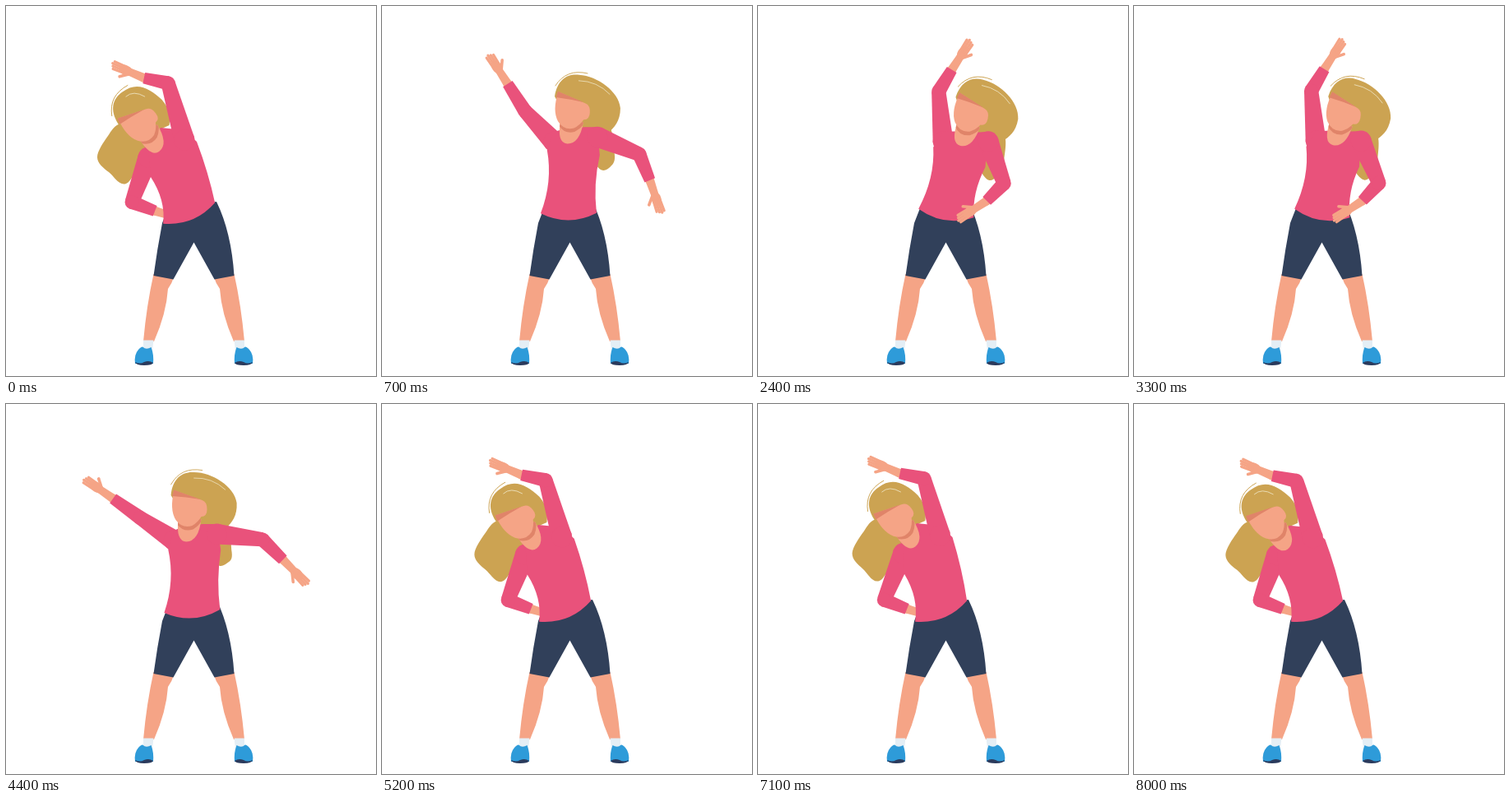
Recreate the animation shown at these times as an HTML page with a canvas. Size 450 px wide and 450 px high, loop 8.1 s.

```html
<!DOCTYPE html>
<html lang="en">
<head>
<meta charset="utf-8">
<title>Side bends</title>
<style>
  html, body { margin: 0; width: 100%; height: 100%; overflow: hidden; background: #fff; }
  canvas { display: block; width: 450px; height: 450px; }
</style>
</head>
<body>
<canvas id="stage"></canvas>
<script>
const canvas = document.getElementById('stage');
const ctx = canvas.getContext('2d');
const scale = window.devicePixelRatio || 1;
canvas.width = canvas.height = 450 * scale;

const PINK = '#e9527b', SKIN = '#f5a486', SHADE = '#e08469', HAIR = '#cca352',
      NAVY = '#31405a', BLUE = '#2e9bd9', SOLE = '#2a3a5c', SOCK = '#e4eef5';
const LOOP = 8100, HALF = LOOP / 2, PULSE = HALF / 3, SWING = 1150, MID = 0.33;

// Arms: upper, fore and hand angle in degrees, then upper and fore length.
const leftBend = {
  head: [163, 145], turn: [-38], volume: [40], hip: [-22], waist: [3],
  shoulderA: [173, 184], armA: [-250, -339, -343, 58, 30], pitA: [176, 208],
  shoulderB: [217, 163], armB: [-106, -168, -157, 72, 30], pitB: [232, 165], thumbB: [-1],
  locks: [124, 158, 111, 184, 125, 202, 150, 213]
};
const upright = {
  head: [220, 128], turn: [0], volume: [60], hip: [-3.5], waist: [-5],
  shoulderA: [204, 166], armA: [-147, -146, -147, 49, 41], pitA: [197, 177],
  shoulderB: [256, 158], armB: [6, 43, 44, 56, 35], pitB: [261, 177], thumbB: [1],
  locks: [240, 170, 256, 195, 269, 193, 274, 180]
};
const rightBend = {
  head: [257, 132], turn: [13], volume: [60], hip: [9], waist: [-9],
  shoulderA: [226, 165], armA: [-95, -59, -57, 61, 31], pitA: [214, 172],
  shoulderB: [281, 165], armB: [70, 135, 147, 54, 30], pitB: [277, 196], thumbB: [1],
  locks: [262, 180, 278, 210, 291, 207, 300, 187]
};

let weights, lean, lift;

const rad = d => d * Math.PI / 180;
const step = ([x, y], deg, len) => [x + Math.cos(rad(deg)) * len, y + Math.sin(rad(deg)) * len];
const mix = key => leftBend[key].map((l, i) =>
  l * weights[0] + upright[key][i] * weights[1] + rightBend[key][i] * weights[2]);

// The pulse moves the upper body and leaves the hips in place.
function sway([x, y]) {
  const h = Math.min(1, Math.max(0, (255 - y) / 105));
  const s = h * h * (3 - 2 * h);
  return [x + lean * s, y + lift * s];
}
const joint = key => sway(mix(key));

function headPoint(x, y) {
  const turn = mix('turn')[0];
  return step(step(joint('head'), turn, x), turn + 90, y);
}

function onHead(paint) {
  ctx.save();
  ctx.translate(...joint('head'));
  ctx.rotate(rad(mix('turn')[0]));
  paint();
  ctx.restore();
}

function draw(d, color) {
  ctx.fillStyle = color;
  ctx.fill(new Path2D(d));
}

function line(d, color, width) {
  ctx.lineCap = 'round';
  ctx.strokeStyle = color;
  ctx.lineWidth = width;
  ctx.stroke(new Path2D(d));
}

// Closed smooth curve through the points.
function blob(pts, color) {
  const n = pts.length, p = i => pts[(i + n) % n];
  let d = `M${pts[0]}`;
  pts.forEach((b, i) => {
    const a = p(i - 1), c = p(i + 1), e = p(i + 2);
    const c1 = [0, 1].map(k => b[k] + (c[k] - a[k]) / 6);
    const c2 = [0, 1].map(k => c[k] - (e[k] - b[k]) / 6);
    d += `C${c1} ${c2} ${c}`;
  });
  draw(d, color);
}

function limb(a, b, ra, rb, color) {
  const dir = Math.atan2(b[1] - a[1], b[0] - a[0]) * 180 / Math.PI;
  const edge = (p, r, side) => step(p, dir + side * 90, r);
  draw(`M${edge(a, ra, 1)}L${edge(b, rb, 1)}L${edge(b, rb, -1)}L${edge(a, ra, -1)}Z`, color);
  ctx.beginPath();
  ctx.arc(...a, ra, 0, Math.PI * 2);
  ctx.fill();
}

function drawHand(wrist, deg, side) {
  ctx.save();
  ctx.translate(...wrist);
  ctx.rotate(rad(deg));
  limb([0, 0], [20, 0], 5.4, 4.6, SKIN);
  ctx.beginPath();
  ctx.ellipse(24, 0, 9, 6, 0, 0, Math.PI * 2);
  ctx.fill();
  for (let i = -1.5; i < 2; i++) {
    line(`M26 ${i * 2.7}L${42 - Math.abs(i + side * 0.5) * 1.5} ${i * 3}`, SKIN, 3.2);
  }
  line(`M19 ${side * 3}L28 ${side * 10}`, SKIN, 3.6);
  ctx.restore();
}

function drawArm(name, side) {
  const [upper, fore, hand, upperLen, foreLen] = mix('arm' + name);
  const start = mix('shoulder' + name);
  const bend = step(start, upper, upperLen);
  const [shoulder, elbow, cuff] = [start, bend, step(bend, fore, foreLen)].map(sway);
  drawHand(cuff, hand, side);
  limb(shoulder, elbow, 12.5, 8.6, PINK);
  limb(elbow, cuff, 8.6, 6.8, PINK);
}

function drawLeg() {
  draw('M179.500 326L204 330Q202 337 197 344Q195 374 180 408L167 408Q171 364 179.500 326Z', SKIN);
  draw('M167 406.500H179.500L178 419H167Z', SOCK);
  draw('M157 435Q155.500 424 161 418Q166 412 168 416Q172 418 176.500 415Q180 424 179 435Z', BLUE);
  draw('M157 433Q163 436 168 433Q174 430.500 179 434Q178 437 168 437Q158 437 157 433Z', SOLE);
}

function drawLegs() {
  drawLeg();
  ctx.save();
  ctx.translate(457, 0);
  ctx.scale(-1, 1);
  drawLeg();
  ctx.restore();
}

function drawShorts() {
  draw('M197 246L190 264Q184 295 179.500 328L203.500 332.500L228.500 287.500' +
       'L253.500 332.500L277.500 328Q274 275 256 238Z', NAVY);
}

function drawHair() {
  const k = mix('locks'), b = mix('volume')[0];
  const locks = [0, 2, 4, 6].map(i => sway([k[i], k[i + 1]]));
  blob([headPoint(-16, -16), ...locks, headPoint(b - 18, 6)], HAIR);
  onHead(() => {
    draw(`M-20 -17C-18 -38 -6 -46 8 -45C30 -45 ${b - 3} -28 ${b} -8` +
         `C${b + 1} 8 ${b - 6} 16 ${b - 12} 22L0 15Z`, HAIR);
    line('M-20 -30Q-8 -52 18 -47.500', HAIR, 0.9);
    line(`M8 -38Q${b / 2} -39 ${b - 14} -24`, '#eadcb4', 0.9);
  });
}

function drawTorso() {
  const tilt = mix('hip')[0];
  const hips = [227 + tilt * 0.2, 252];
  const hemA = step(hips, tilt, -34), hemB = step(hips, tilt, 34);
  const hem = step(hips, tilt + 90, 17);
  const pitA = joint('pitA'), pitB = joint('pitB');
  const side = (p, q, dx) => [(p[0] + q[0]) / 2 + dx, (p[1] + q[1]) / 2];
  const top = key => step(joint(key), -90, 12);
  draw(`M${hemA}Q${hem} ${hemB}Q${side(hemB, pitB, mix('waist')[0])} ${pitB}` +
       `L${top('shoulderB')}L${headPoint(18, 18)}L${headPoint(-12, 24)}L${top('shoulderA')}` +
       `L${pitA}Q${side(pitA, hemA, 11)} ${hemA}Z`, PINK);
}

function drawHead() {
  const face = 'M-16 -23Q-22 0 -14 13Q-6 24 6 20Q13 16 17 9Q24 9 24 0Q24 -9 18 -11Z';
  const neck = 'M-11 12Q-14 39 -1 39.500Q14 39 17 12Z';
  onHead(() => {
    draw(neck, SKIN);
    ctx.save();
    ctx.clip(new Path2D(neck));
    ctx.translate(1, 4.5);
    draw(face, SHADE);
    ctx.restore();
    draw(face, SKIN);
    draw('M-16.500 -23.500L16 -12Q-2 -15 -18.500 -16Z', SHADE);
  });
}

function setPose(t) {
  const half = t % HALF;
  const x = Math.min(1, half / SWING) ** 0.8;
  const ease = (1 - Math.cos(Math.PI * x)) / 2;
  const u = t < HALF ? 1 - ease : ease;
  weights = [u * (u - MID) / (1 - MID), u * (1 - u) / (MID * (1 - MID)), (u - MID) * (u - 1) / MID];
  const up = (1 - Math.cos(2 * Math.PI * half / PULSE)) / 2;
  const right = Math.max(0, 1 - u / MID) ** 2;
  const left = Math.max(0, (u - MID) / (1 - MID)) ** 2;
  lean = 9 * up * left - 7.5 * (up - 0.29) * right;
  lift = -6 * up * left - 1.5 * (up - 0.29) * right;
}

function frame(now) {
  setPose(Math.floor(now % LOOP / 100) * 100);
  ctx.setTransform(scale, 0, 0, scale, 0, 0);
  ctx.fillStyle = '#fff';
  ctx.fillRect(0, 0, 450, 450);
  drawLegs();
  drawHair();
  drawArm('A', 1);
  drawShorts();
  drawTorso();
  drawArm('B', mix('thumbB')[0]);
  drawHead();
  requestAnimationFrame(frame);
}
requestAnimationFrame(frame);
</script>
</body>
</html>
```
